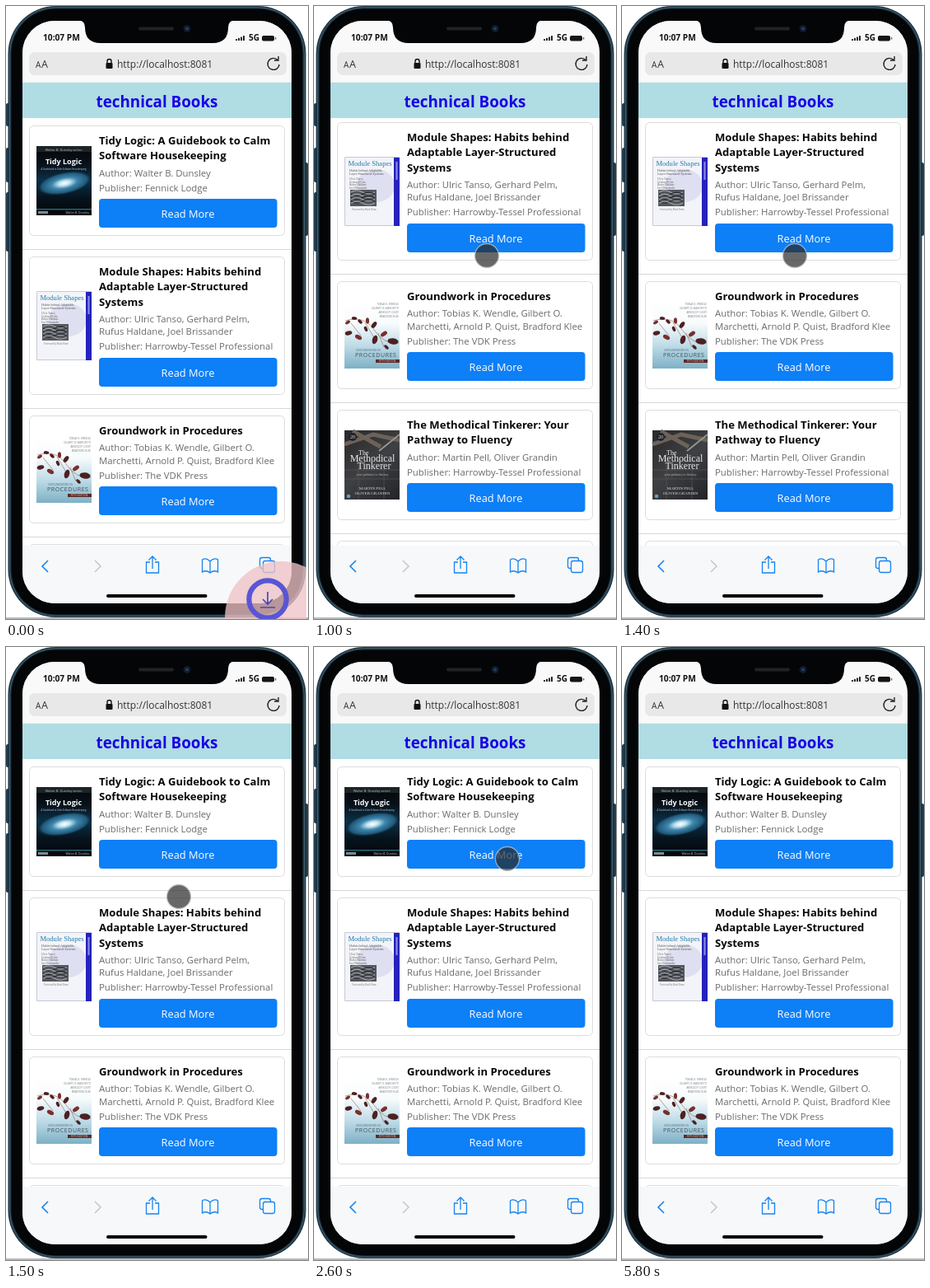
Recreate the animation shown at these times as an HTML page with a canvas. Size 367 by 744 pixels, loop 6500 ms.

```html
<!DOCTYPE html>
<html lang="en">
<head>
<meta charset="utf-8">
<title>Book list on a phone</title>
<style>
html, body { margin: 0; width: 100%; height: 100%; overflow: hidden; background: #fff; }
canvas { display: block; width: 367px; height: 744px; }
</style>
</head>
<body>
<canvas id="stage" width="367" height="744"></canvas>
<script>
const ctx = document.getElementById('stage').getContext('2d');
const SANS = '"Open Sans", "Noto Sans", sans-serif';
const SERIF = '"Liberation Serif", serif';
const LOOP = 6500, STEP = 100;
const BLUE = '#1683f2';
const SCROLL_END = 325;
const SCREEN = [20, 18, 327, 707, 39];

const books = [
  { title: ['Tidy Logic: A Guidebook to Calm', 'Software Housekeeping'],
    author: ['Walter B. Dunsley'], publisher: 'Fennick Lodge', cover: galaxyCover },
  { title: ['Module Shapes: Habits behind', 'Adaptable Layer-Structured', 'Systems'],
    author: ['Ulric Tanso, Gerhard Pelm,', 'Rufus Haldane, Joel Brissander'],
    publisher: 'Harrowby-Tessel Professional', cover: paleCover },
  { title: ['Groundwork in Procedures'],
    author: ['Tobias K. Wendle, Gilbert O.', 'Marchetti, Arnold P. Quist, Bradford Klee'],
    publisher: 'The VDK Press', cover: mobileCover },
  { title: ['The Methodical Tinkerer: Your', 'Pathway to Fluency'],
    author: ['Martin Pell, Oliver Grandin'],
    publisher: 'Harrowby-Tessel Professional', cover: toolsCover },
  { title: ['Passing the Syntax Screening:', '204 Engineering Exercises and', 'Answers'],
    author: ['Hazel Vuorinne McTarrow'], publisher: 'TalentJug', cover: limeCover }
];

function box(x, y, w, h, r, fill, stroke, width = 1) {
  ctx.beginPath();
  ctx.roundRect(x, y, w, h, r);
  if (fill) { ctx.fillStyle = fill; ctx.fill(); }
  if (stroke) { ctx.strokeStyle = stroke; ctx.lineWidth = width; ctx.stroke(); }
}

function disc(x, y, rx, fill, ry = rx, turn = 0) {
  ctx.beginPath();
  ctx.ellipse(x, y, rx, ry, turn, 0, Math.PI * 2);
  ctx.fillStyle = fill;
  ctx.fill();
}

function ring(x, y, r, color, width) {
  ctx.beginPath();
  ctx.arc(x, y, r, 0, Math.PI * 2);
  ctx.strokeStyle = color;
  ctx.lineWidth = width;
  ctx.stroke();
}

function line(path, color, width = 1) {
  ctx.strokeStyle = color;
  ctx.lineWidth = width;
  ctx.stroke(new Path2D(path));
}

function text(str, x, y, font, color, align = 'left') {
  ctx.font = font;
  ctx.fillStyle = color;
  ctx.textAlign = align;
  ctx.fillText(str, x, y);
}

function gradient(x0, y0, x1, y1, ...colors) {
  const g = ctx.createLinearGradient(x0, y0, x1, y1);
  colors.forEach((c, i) => g.addColorStop(i / (colors.length - 1), c));
  return g;
}

// Covers are drawn in a 67 x 84 box.
function galaxyCover() {
  box(0, 0, 67, 84, 0, gradient(0, 0, 0, 84, '#050608', '#07111a', '#0b3048', '#06131d', '#050608'));
  box(0, 0, 67, 7, 0, '#1c2428');
  text('Walter B. Dunsley series', 33, 5.5, `4px ${SANS}`, '#bcc5c5', 'center');
  text('Tidy Logic', 33, 22, `700 9px ${SANS}`, '#fff', 'center');
  text('A Guidebook to Calm Software Housekeeping', 33, 29, `2.6px ${SANS}`, '#c8d0d8', 'center');
  ctx.save();
  ctx.translate(34, 45);
  ctx.rotate(-0.2);
  ctx.scale(1, 0.4);
  const glow = ctx.createRadialGradient(0, 0, 0, 0, 0, 35);
  glow.addColorStop(0, '#fff');
  glow.addColorStop(0.2, '#c2e4f0');
  glow.addColorStop(0.45, '#3f86ad');
  glow.addColorStop(0.8, '#1f5878');
  glow.addColorStop(1, 'rgba(8,18,30,0)');
  disc(0, 0, 35, glow);
  ctx.restore();
  box(0, 76, 67, 1.5, 0, '#27677a');
  box(2, 79, 12, 3, 0, '#7d8b8d');
  text('Walter B. Dunsley', 64, 82, `3.5px ${SANS}`, '#c4c8c8', 'right');
}

function paleCover() {
  box(0.5, 0.5, 66, 83, 0, '#f3f4f9', '#c6c8d6');
  disc(38, 35, 23, '#dedff0', 20);
  box(60, 1, 7, 83, 0, '#2522bd');
  box(62.5, 6, 2, 22, 0, '#8e90e0');
  text('Module Shapes', 31, 11, `8.6px ${SERIF}`, '#237da9', 'center');
  text('Habits behind Adaptable', 6, 18, `4px ${SERIF}`, '#555');
  text('Layer-Structured Systems', 6, 22, `4px ${SERIF}`, '#555');
  ['Ulric Tanso', 'Gerhard Pelm', 'Rufus Haldane', 'Joel Brissander']
    .forEach((n, i) => text(n, 6, 28 + i * 3.5, `3.5px ${SERIF}`, '#666'));
  box(7, 40, 32, 20, 0, '#54575c');
  for (let i = 0; i < 7; i++) {
    line(`M8 ${43 + i * 2.2} q7 ${i % 2 ? 4 : -4} 14 0 t15 0`, i % 2 ? '#20242a' : '#a9adb2', 1.1);
  }
  text('Foreword by Basil Orme', 9, 65, `3px ${SERIF}`, '#777');
}

function mobileCover() {
  box(0, 0, 67, 82, 0, gradient(0, 0, 0, 82, '#fff', '#f8fbfc', '#bddbe7', '#7eb0c5'));
  ['TOBIAS K. WENDLE', 'GILBERT O. MARCHETTI', 'ARNOLD P. QUIST', 'BRADFORD KLEE']
    .forEach((n, i) => text(n, 66, 5 + i * 5, `3px ${SANS}`, '#7b7f83', 'right'));
  line('M1 24 Q24 17 36 35 T66 51 M8 27 L20 42 M25 26 L38 48 M41 39 L48 56', '#85645c', 0.6);
  const leaves = [[4, 26, 3], [12, 21, 3], [19, 25, 3], [28, 24, 3.3], [36, 29, 4],
    [5, 39, 4], [17, 44, 4], [26, 34, 3], [37, 47, 5], [48, 40, 4], [59, 49, 6], [51, 56, 3]];
  leaves.forEach(([x, y, r], i) => disc(x, y, r * 1.1, i % 3 ? '#4d2021' : '#79302b', r * 0.62, i * 0.7 - 0.6));
  text('GROUNDWORK IN', 14, 61, `3.5px ${SANS}`, '#577080');
  ctx.letterSpacing = '0.6px';
  text('PROCEDURES', 13, 68, `7px ${SANS}`, '#40515f');
  ctx.letterSpacing = '0px';
  box(38, 71, 29, 4, 0, '#5d2928');
  text('FIFTH EDITION', 52, 74.2, `3px ${SANS}`, '#e7c9b5', 'center');
}

function toolsCover() {
  box(0, 0, 67, 84, 0, gradient(0, 0, 67, 84, '#292829', '#3f4043', '#222428'));
  line('M0 17 L35 5 L67 12 M10 1 L44 20', '#6d6259', 5);
  line('M42 25 L67 5', '#96948e', 2);
  line('M0 48 H67 M0 59 H67 M17 27 V84 M48 30 V84', '#5b5c60', 0.6);
  disc(10, 8, 5, '#20232a');
  text('20', 10, 10, `6px ${SERIF}`, '#ddd', 'center');
  text('The', 17, 30, `8px ${SERIF}`, '#eee');
  text('Methodical', 34, 38, `12px ${SERIF}`, '#e8e8e8', 'center');
  text('Tinkerer', 36, 47, `12px ${SERIF}`, '#e8e8e8', 'center');
  text('your pathway to fluency', 34, 55, `4px ${SERIF}`, '#bbb', 'center');
  text('MARTIN PELL', 34, 72, `5px ${SERIF}`, '#ddd', 'center');
  text('OLIVER GRANDIN', 34, 78, `5px ${SERIF}`, '#ddd', 'center');
  disc(5, 80, 2.3, '#5ba2be');
}

function limeCover() {
  box(0, 0, 67, 84, 0, gradient(0, 0, 0, 84, '#79d20e', '#9be61f', '#74c414'));
  text('PASSING', 33, 10, `700 8px ${SANS}`, '#172109', 'center');
  text('THE', 33, 14, `700 3px ${SANS}`, '#314b0e', 'center');
  text('SYNTAX SCREENING', 33, 23, `700 6px ${SANS}`, '#172109', 'center');
  text('204 ENGINEERING EXERCISES AND ANSWERS', 33, 29, `2.8px ${SANS}`, '#345314', 'center');
  disc(26, 39, 6, '#858d76', 4, -0.6);
  disc(43, 39, 6, '#858d76', 4, 0.6);
  disc(34, 53, 15, '#4b5143');
  disc(34, 53, 12, '#d3cfb7');
  disc(34, 53, 7, '#777965');
  line('M34 53 L29 46 M34 53 L41 49 M25 65 L21 71 M43 65 L48 71', '#292e27', 2);
  box(0, 77, 67, 7, 0, '#26341a');
  text('HAZEL VUORINNE McTARROW', 33, 82, `4px ${SANS}`, '#d5e9b5', 'center');
}

function drawBook(book, top) {
  const regular = `11.4px ${SANS}`;
  let y = top + 23;
  book.title.forEach((s, i) => text(s, 113, y + i * 18.3, `700 13.1px ${SANS}`, '#080808'));
  y += (book.title.length - 1) * 18.3 + 20.2;
  book.author.forEach((s, i) =>
    text((i ? '' : 'Author: ') + s, 113, y + i * 15.5, regular, '#686b6e'));
  y += (book.author.length - 1) * 15.5 + 18;
  text('Publisher: ' + book.publisher, 113, y, regular, '#686b6e');
  const button = Math.floor(y + 9.8);
  box(113, button, 216.5, 35, 4, '#0d7ff7');
  text('Read More', 221, button + 23, `12.8px ${SANS}`, '#fff', 'center');
  const bottom = button + 44;
  box(28.5, top + 0.5, 310, bottom - top, 5, null, '#dcdcdc');
  ctx.save();
  ctx.translate(37, Math.round((top + bottom) / 2 - 41.5));
  book.cover();
  ctx.restore();
  return bottom;
}

function drawPage(scroll) {
  ctx.save();
  ctx.beginPath();
  ctx.rect(20, 136, 327, 519);
  ctx.clip();
  ctx.translate(0, -scroll);
  let top = 145;
  for (const book of books) {
    const bottom = drawBook(book, top);
    box(20, bottom + 17, 327, 1, 0, '#d8d8d8');
    top = bottom + 26;
  }
  ctx.restore();
  box(20, 92.5, 327, 43.5, 0, '#b0dce3');
  text('technical Books', 183.5, 122.5, `700 18.8px ${SANS}`, '#1900e4', 'center');
}

function drawBody() {
  const side = '#203b4b';
  [[118, 28], [172, 42], [226, 72]].forEach(([y, h]) => box(0, y, 6, h, 2, side));
  box(361, 190, 6, 89, 2, side);
  box(2.5, 0, 362, 742, 58, '#1b3444');
  box(4.5, 1.7, 358, 738.6, 56, null, '#48606c');
  box(6.5, 3.5, 354, 735, 54, '#030506');
  box(...SCREEN, '#fff');
  box(0, 742.5, 367, 1, 0, '#777b7d');
}

function drawBrowser() {
  ctx.save();
  ctx.beginPath();
  ctx.roundRect(...SCREEN);
  ctx.clip();
  box(20, 18, 327, 74.5, 0, '#f9f9f9');
  box(20, 655, 327, 73, 0, '#f7f8f9');
  ctx.restore();

  ctx.fillStyle = '#030506';
  ctx.fill(new Path2D('M88 17 Q96 18 96 26 Q96 45 115 45 H251 Q270 45 270 26 Q270 18 278 17 Z'));
  box(161, 25.5, 43, 4, 2, '#202326');
  disc(220, 27.5, 4.5, '#111b2b');
  disc(220, 27.5, 2, '#223e64');

  text('10:07 PM', 45, 41.5, `700 10.2px ${SANS}`, '#111');
  for (let i = 0; i < 4; i++) box(279 + i * 3, 40 - i * 1.3, 2, 2 + i * 1.3, 0.5, '#222');
  text('5G', 295, 41.5, `700 10px ${SANS}`, '#111');
  box(311, 36, 15, 6.5, 2, '#151515');
  box(327, 38, 1.3, 2.5, 0.5, '#555');

  box(28, 56, 313, 28, 7, '#e8e8e9');
  text('A', 36, 75, `10px ${SANS}`, '#333');
  text('A', 43, 75, `12.5px ${SANS}`, '#333');
  box(121.5, 69, 8, 7, 1, '#111');
  line('M123 69 V67 A2.5 2.5 0 0 1 128 67 V69', '#111', 1.4);
  text('http://localhost:8081', 135, 74.5, `12px ${SANS}`, '#333');
  line('M330.5 66 A7 7 0 1 0 332 71 M326 66 H331 V61', '#222', 1.4);

  line('M51 673 L44 680 L51 687', BLUE, 1.6);
  line('M108 673 L115 680 L108 687', '#c6c9cc', 1.6);
  line('M175 675 H170.5 V688 H185.5 V675 H181 M178 683 V668 M173.5 672.5 L178 668 L182.5 672.5', BLUE, 1.3);
  line('M248 674 Q243 669 238.5 672 V687 Q243 684 248 688 Q253 684 257.5 687 V672 Q253 669 248 674 V688', BLUE, 1.3);
  box(308.5, 669.5, 13, 13, 2.5, null, BLUE, 1.3);
  box(312.5, 673.5, 14, 14, 2.5, '#f7f8f9', BLUE, 1.3);
  box(122, 714, 122.5, 4, 2, '#050505');
}

function drawRipple() {
  ctx.save();
  ctx.beginPath();
  ctx.rect(260, 674, 105, 70);
  ctx.clip();
  disc(334, 742, 68, 'rgba(238,194,198,0.77)');
  ctx.restore();
  ring(318, 720, 22.7, '#5955d5', 6.2);
  line('M318 711 V726 M312 720 L318 726 L324 720 M309 730 H327', '#4549b8', 1.7);
}

function drawTouch([x, y]) {
  disc(x, y, 14.5, 'rgba(40,40,40,0.7)');
  ring(x, y, 14.5, 'rgba(190,195,200,0.75)', 1.3);
}

const progress = (t, from, to) => Math.min(1, Math.max(0, (t - from) / (to - from)));
const easeOut = p => 1 - (1 - p) ** 2;
const mix = (a, b, p) => a.map((v, i) => v + (b[i] - v) * p);

function touchAt(t) {
  const rest = [210, 303];
  return t < 1700
    ? mix([318, 720], rest, easeOut(progress(t, 0, 700)))
    : mix(rest, [235, 257], easeOut(progress(t, 1700, 2600)));
}

function render(now) {
  const t = Math.floor((now % LOOP) / STEP) * STEP;
  const scroll = SCROLL_END * (progress(t, 900, 1100) - progress(t, 1300, 1500));
  ctx.fillStyle = '#fff';
  ctx.fillRect(0, 0, 367, 744);
  drawBody();
  drawPage(Math.round(scroll));
  drawBrowser();
  if (t < 100) drawRipple();
  else if (t < 4400) drawTouch(touchAt(t));
}

let start;
function tick(now) {
  start ??= now;
  render(now - start);
  requestAnimationFrame(tick);
}
render(0);
requestAnimationFrame(tick);
</script>
</body>
</html>
```
